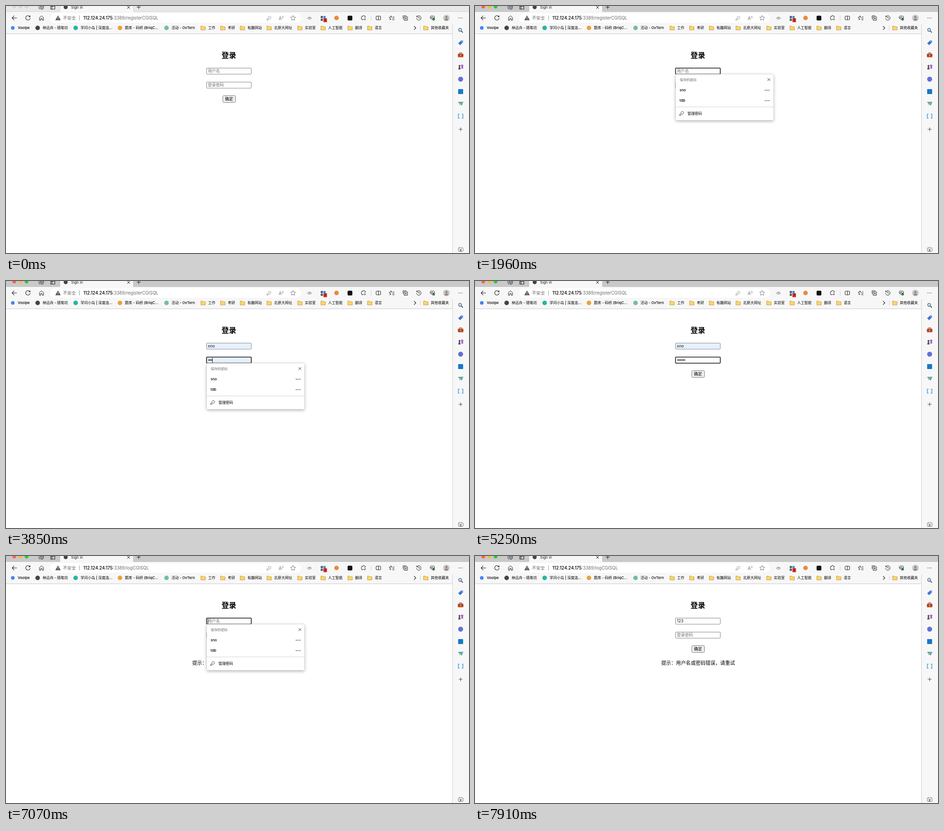
These frames come from a looping animation (1024 px wide and 547 px high, 8000 ms). An HTML page with a canvas:

```html
<!DOCTYPE html>
<html lang="zh">
<head>
<meta charset="utf-8">
<title>登录</title>
<style>
  html, body { margin: 0; width: 100%; height: 100%; overflow: hidden; background: #fff; }
  canvas { display: block; }
</style>
</head>
<body>
<canvas id="stage" width="1024" height="547"></canvas>
<script>
const ctx = document.getElementById('stage').getContext('2d');
const LOOP = 8000;
const FONT = 'Inter, "Noto Sans CJK SC", "Noto Sans CJK", sans-serif';
const INK = '#1c1c1c', GREY = '#6f6f6f', BAR = '#f7f7f7', FILLED = '#e7f0fd';
const USERS = ['sno', 'tdb'];

// Basic drawing; text is placed by its left edge and vertical centre.
function text(s, x, y, size, color = INK, weight = 400, align = 'left') {
  ctx.font = `${weight} ${size}px ${FONT}`;
  ctx.fillStyle = color;
  ctx.textAlign = align;
  ctx.fillText(s, x, y + size * 0.37);
}

function rect(x, y, w, h, color) {
  ctx.fillStyle = color;
  ctx.fillRect(x, y, w, h);
}

function box(x, y, w, h, r, fill, stroke, width = 1) {
  ctx.beginPath();
  ctx.roundRect(x, y, w, h, r);
  if (fill) { ctx.fillStyle = fill; ctx.fill(); }
  if (stroke) { ctx.strokeStyle = stroke; ctx.lineWidth = width; ctx.stroke(); }
}

function dot(x, y, r, color) {
  ctx.beginPath();
  ctx.arc(x, y, r, 0, Math.PI * 2);
  ctx.fillStyle = color;
  ctx.fill();
}

function path(x, y, d, stroke, width = 1, fill) {
  ctx.save();
  ctx.translate(x, y);
  const p = new Path2D(d);
  if (fill) { ctx.fillStyle = fill; ctx.fill(p); }
  if (stroke) { ctx.strokeStyle = stroke; ctx.lineWidth = width; ctx.stroke(p); }
  ctx.restore();
}

function dots(x, y, gap, r) {
  for (let i = -1; i <= 1; i++) dot(x + i * gap, y, r, INK);
}

const ICON = {
  back: 'M5.5 0H-5M-.3 -4.8L-5 0L-.3 4.8',
  reload: 'M4.2 -3A5 5 0 1 0 5 .3M4.7 -5.5V-2.6H1.7',
  cross: 'M-3 -3L3 3M3 -3L-3 3',
  plus: 'M-4.2 0H4.2M0 -4.2V4.2',
  home: 'M-4.5 -.8L0 -5L4.5 -.8V5H1.6V1.3H-1.6V5H-4.5Z',
  key: 'M-.6 .2A3 3 0 1 1 1.2 1.5L-.2 2.8H-1.5V4.2H-4.3V2.4Z',
  star: 'M0 -5.5L1.7 -1.9L5.5 -1.5L2.7 1.2L3.4 5L0 3.1L-3.4 5L-2.7 1.2L-5.5 -1.5L-1.7 -1.9Z',
  puzzle: 'M-3.5 -3.5H-1A1.5 1.5 0 0 1 2 -3.5H4V-1A1.6 1.6 0 0 0 4 2V4.5H1.8A1.6 1.6 0 0 0 -1.2 4.5H-3.5V2A1.5 1.5 0 0 1 -3.5 -1Z',
  split: 'M-1 -4H-3.5Q-5 -4 -5 -2.5V2.5Q-5 4 -3.5 4H-1M1 -4H3.5Q5 -4 5 -2.5V2.5Q5 4 3.5 4H1M0 -5.3V5.3',
  favourites: 'M1.2 -1.6H-.6L-2 -5L-3.2 -1.6H-6L-3.8 .6L-4.5 4L-1.5 2.2M2.5 -2.5H5.5M1 .8H5.5M1 4H5.5',
  collect: 'M-2.5 -2.5H5V5H-2.5ZM-4.8 2V-4.8H2.5M1.2 -.8V3.2M-.8 1.2H3.2',
  history: 'M-4 -3A5 5 0 1 1 -5 .5M-4.7 -5.3V-2.3H-1.8M0 -3V.5H2.5',
  heart: 'M0 5L-4.4 .5A2.9 2.9 0 0 1 0 -3.2A2.9 2.9 0 0 1 4.4 .5ZM-5 .5H-2L-.8 -1.5L.7 2L1.7 .5H5',
  cube: 'M-5 -2.5L-1 -4.5M-5 -2.5V3L-2.5 4.5M-2 -1.5L1.5 -3.2L5 -1.5V3L1.5 5L-2 3ZM-2 -1.5L1.5 .3L5 -1.5M1.5 .3V5',
  panel: 'M-4.5 -4H4.5V4.5H-4.5ZM-1.8 -2V4.5M-4.5 -2H4.5'
};

function folder(x, y) {
  path(x, y, 'M-5 -4H-1L.5 -2.5H5V4.5H-5Z', '#b58a25', .8, '#ffd668');
}

function bookmark(x, label) {
  folder(x, 48.5);
  text(label, x + 11, 48.5, 8, '#000', 500);
}

function titleBar(active) {
  rect(0, 0, 1024, 13, active ? '#c9c9c9' : '#e8e8e8');
  rect(0, 12, 1024, 1, active ? '#c0c0c0' : '#d2d2d2');
  rect(119, 0, 163, 14, BAR);
  rect(118.5, 0, 1, 12, active ? '#b5b5b5' : '#cfcfcf');
  rect(281.5, 0, 1, 12, active ? '#b5b5b5' : '#cfcfcf');
  const lights = active ? ['#ff5f57', '#febc2e', '#28c840'] : ['#d6d6d6', '#d6d6d6', '#d6d6d6'];
  lights.forEach((c, i) => dot(18.3 + i * 13.6, 1.3, 4.1, c));
  path(78, 2.5, ICON.cube, '#333');
  path(103.5, 2.5, ICON.panel, '#222', 1.1);
  dot(132, 2.5, 4.5, '#444');
  text('Sign in', 144, 3, 8.1, INK);
  path(271, 3, ICON.cross, INK, 1);
  path(293.5, 2.5, ICON.plus, INK, 1);
}

function toolbar(s) {
  rect(0, 13, 1024, 49, BAR);
  path(18.5, 26.5, ICON.back, INK, 1.1);
  path(48.5, 26.5, s.loading ? ICON.cross : ICON.reload, INK, 1.1);
  path(78.5, 26.5, ICON.home, INK, 1);
  box(97.5, 16, 555, 21, 10.5, '#fff');
  path(115, 26.5, 'M0 -5L5.5 4.7H-5.5Z', '#555', .6, '#555');
  rect(114.5, 24.5, 1.1, 3.4, '#fff');
  rect(114.5, 29, 1.1, 1.1, '#fff');
  text('不安全', 126, 26.5, 9.5, '#666');
  rect(162, 21, 1, 11, '#999');

  const host = '112.124.24.175';
  text(host, 171, 26.5, 9.8, '#000', 500);
  const end = 171 + ctx.measureText(host).width;
  text(s.url, end, 26.5, 9.7, '#6c6c6c');

  path(581, 27, ICON.key, '#888', .9);
  text('A', 603, 27, 10, '#777');
  path(611, 24.5, 'M-.5 -2Q1 0 -.5 2M1.3 -3Q3.4 0 1.3 3', '#888', .8);
  path(635, 26.5, ICON.star, '#666', .9);
  path(671, 27, 'M-5 0Q0 -5 5 0Q0 5 -5 0ZM-2 0H3M-1 -1.5H2', '#8b8b8b', 1);

  [[696, 22, '#56616d'], [702, 22, '#3c8fd8'], [696, 28, '#56616d']]
    .forEach(([x, y, c]) => box(x, y, 5, 5, 1, c));
  box(702, 27, 8, 9, 1, '#e33b2e');
  text('4', 706, 31.6, 7, '#311', 500, 'center');
  dot(731, 26.5, 5, '#e98a3c');
  box(755.5, 21.5, 10.5, 10.5, 2, '#111');
  path(790.5, 26, ICON.puzzle, INK, 1);
  rect(807, 21, 1, 11, '#d2d2d2');
  path(823.5, 26.5, ICON.split, INK);
  path(853.5, 26.5, ICON.favourites, INK);
  path(883, 26.5, ICON.collect, INK);
  path(913, 26.5, ICON.history, INK);
  path(943, 26, ICON.heart, INK);
  dot(946, 29.5, 2.6, '#28803d');

  dot(974, 26.5, 7.3, '#cbc8c6');
  dot(974, 24.5, 2.5, '#8c8885');
  path(974, 27, 'M-4.2 4Q-4 .8 0 .8Q4 .8 4.2 4Q0 6 -4.2 4Z', null, 1, '#8c8885');
  dots(1005, 26.5, 3.5, .8);
}

function bookmarks() {
  const sites = [
    [15, 'Voolpe', '#4285f4'],
    [70, '林远舟 - 随笔坊', '#444'],
    [154, '学问小岛 | 深度连...', '#25b5a0'],
    [252, '题库 - 码桥 (BriqC...', '#e9a23a'],
    [355, '活动 - OvTern', '#75bd9d']
  ];
  for (const [x, label, color] of sites) {
    dot(x, 48.5, x === 15 ? 4 : 5, color);
    text(label, x + 11, 48.5, 8, '#000', 500);
  }
  const folders = [
    [436, '工作'], [479.5, '考研'], [523, '有趣网站'], [582, '北原大网址'],
    [650, '实验室'], [701.5, '人工智能'], [761, '翻译'], [804.5, '语言'], [928.5, '其他收藏夹']
  ];
  for (const [x, label] of folders) bookmark(x, label);
  path(904.5, 48.5, 'M-2 -4L2 0L-2 4', INK, 1.1);
  rect(916, 43, 1, 11, '#d0d0d0');
  rect(0, 61, 987, 1, '#c8c8c8');
}

function sidebar() {
  rect(987, 40, 37, 507, BAR);
  rect(987, 40, 1, 507, '#cfcfcf');
  const x = 1005.5;
  path(x, 54, 'M1.5 1.3L5 4.8', '#3d4650', 1.8);
  path(x, 54, 'M2.2 -1.2A3.4 3.4 0 1 1 -4.6 -1.2A3.4 3.4 0 1 1 2.2 -1.2Z', '#496078', 1.2, '#bfe0f7');
  path(x, 81.5, 'M-5.5 1L1 -5H5.2V-1L-1 5.3Z', null, 1, '#3f74d9');
  dot(x + 3, 78.8, .9, '#fff');

  path(x, 108, 'M-2 -2.5V-4.5H2V-2.5', '#843a21', 1.2);
  box(x - 6, 105.5, 12, 8, 1.2, '#b94a29');
  rect(x - 6, 109, 12, 1, '#7f2f19');
  rect(x - 1, 108, 2, 3, '#f0bb58');

  dot(x - 2.5, 132.5, 2.1, '#555');
  path(x, 135, 'M-3.5 -1H-1.5L.2 5.5H-5.5Z', null, 1, '#555');
  path(x, 135, 'M1 -5.5H2.2V-4.2H3.2V-5.5H4.5V-4.2H6V-2L5 -1L5.8 3.5H1.3L2 -1L1 -2Z', null, 1, '#a35bc8');

  dot(x, 162, 5.5, '#6470d4');
  box(x - 5.5, 184, 11, 11, 1, '#1779c8');

  path(x, 216, 'M-6 -3.5L6 -4L2.5 4.8L-.3 1.8L-2.5 4V.5Z', null, 1, '#3caac2');
  path(x, 216, 'M-2.5 .5L6 -4L-.3 1.8L-2.5 4Z', null, 1, '#e0a649');
  path(x, 244, 'M-2.5 -4.5H-5V4.5H-2.5M2.5 -4.5H5V4.5H2.5', '#4a9fd8', 1.6);
  path(x, 273, ICON.plus, '#444', 1);

  ctx.setLineDash([2, 1.4]);
  box(x - 5, 535, 10.5, 8.5, 1.5, null, INK, 1);
  ctx.setLineDash([]);
  path(x, 540, 'M-2.5 -2.5L2 3M2.5 -2.5L-2 3', INK, 1);
}

function field(y, f, hint) {
  const bg = f.filled ? FILLED : '#fff';
  const border = f.focus ? '#101010' : f.filled ? '#858b94' : '#808080';
  box(443.5, y + .5, 99, 13.5, 1.5, bg, border, f.focus ? 1.6 : 1);
  const mid = y + 7;
  if (f.bullets) {
    for (let i = 0; i < f.bullets; i++) dot(448.5 + i * 3, mid, 1.35, '#111');
  } else {
    text(f.value || hint, 446.5, mid, 8.9, f.value ? '#111' : GREY);
  }
  if (f.caret) {
    const w = f.bullets ? f.bullets * 3 + .5 : f.value && !f.preview ? ctx.measureText(f.value).width : -.5;
    rect(Math.round(446.5 + w - .5), y + 2, 1, 11, '#111');
  }
}

function panel(y, h, title, titleX) {
  ctx.save();
  ctx.shadowColor = 'rgba(0,0,0,.32)';
  ctx.shadowBlur = 7;
  ctx.shadowOffsetY = 2;
  box(444, y, 216, h, 1.5, '#fff');
  ctx.restore();
  box(443.9, y, 216.3, h, 1.5, '#fff', '#d2d2d2', .6);
  text(title, titleX, y + 12, 7.4, '#6a6a6a');
  path(650, y + 12, ICON.cross, '#333', .9);
}

function passwordPanel(y, hover) {
  panel(y, 102, '保存的密码', 453);
  if (hover) box(446.5, y + 24.5, 211, 22, 1, '#e4eefb', '#7f9fba', 1);
  USERS.forEach((name, i) => {
    const mid = y + 35 + i * 23;
    text(name, 452.5, mid, 8, '#000', 500);
    dots(646, mid + .5, 4, 1);
  });
  rect(444, y + 72, 216, 1, '#d4d4d4');
  path(456.5, y + 87, ICON.key, '#333', .9);
  text('管理密码', 470, y + 87, 8, '#000', 500);
}

function dataPanel(items) {
  panel(151, 27 + items.length * 23, '保存的数据', 454);
  items.forEach((s, i) => text(s, 452.5, 186 + i * 23, 8, '#000', 500));
}

// Everything on the page follows from the time within the loop.
function stateAt(t) {
  const during = (a, b) => t >= a && t < b;
  const sent = t >= 5600;
  const s = {
    active: t >= 1050,
    loading: during(5530, 5810),
    url: sent ? ':3389/logCGISQL' : ':3389/registerCGISQL',
    message: sent,
    button: during(5530, 5600) ? '#f5f5f5' : during(5390, 5530) || during(6090, 6650) ? '#e3e3e3' : '#efefef',
    user: {}, pass: {}
  };

  if (!sent) {
    s.user.focus = during(1120, 3850);
    s.user.caret = during(1120, 1960) || during(2520, 3010) || during(3430, 3850);
    s.user.value = t >= 2520 ? USERS[0] : '';
    s.user.filled = t >= 2520;
    s.user.preview = t < 3430;
    s.pass.focus = during(3850, 5530);
    s.pass.caret = during(3850, 4340) || during(4480, 5250);
    s.pass.filled = during(2520, 4480);
    s.pass.bullets = t < 2520 ? 0 : 3 + [4480, 4620, 4760].filter(k => t >= k).length;
    if (during(1400, 3430)) s.popup = () => passwordPanel(151, t >= 2450);
    if (during(3850, 4480)) s.popup = () => passwordPanel(182, false);
  } else {
    s.user.focus = s.user.caret = during(6720, 7840);
    s.user.value = '123'.slice(0, [7350, 7490, 7560].filter(k => t >= k).length);
    if (during(7070, 7350)) s.popup = () => passwordPanel(151, false);
    if (during(7350, 7560)) {
      const saved = ['123', '1106', '1150482637@z.test', '12', '1234'];
      s.popup = () => dataPanel(saved.filter(v => v.startsWith(s.user.value)));
    }
  }
  return s;
}

function draw(t) {
  const s = stateAt(t);
  rect(0, 0, 1024, 547, '#fff');
  titleBar(s.active);
  toolbar(s);
  bookmarks();
  sidebar();

  text('登录', 493, 109, 16.2, '#000', 700, 'center');
  field(137, s.user, '用户名');
  field(168, s.pass, '登录密码');
  box(479.5, 198.5, 28, 15, 2, s.button, '#777', 1);
  text('确定', 493.3, 206, 9, '#000', 400, 'center');
  if (s.message) text('提示：用户名或密码错误，请重试', 412, 237, 10.86, '#000');
  if (s.popup) s.popup();
}

function tick(now) {
  draw(now % LOOP);
  requestAnimationFrame(tick);
}
draw(0);
requestAnimationFrame(tick);
</script>
</body>
</html>
```
